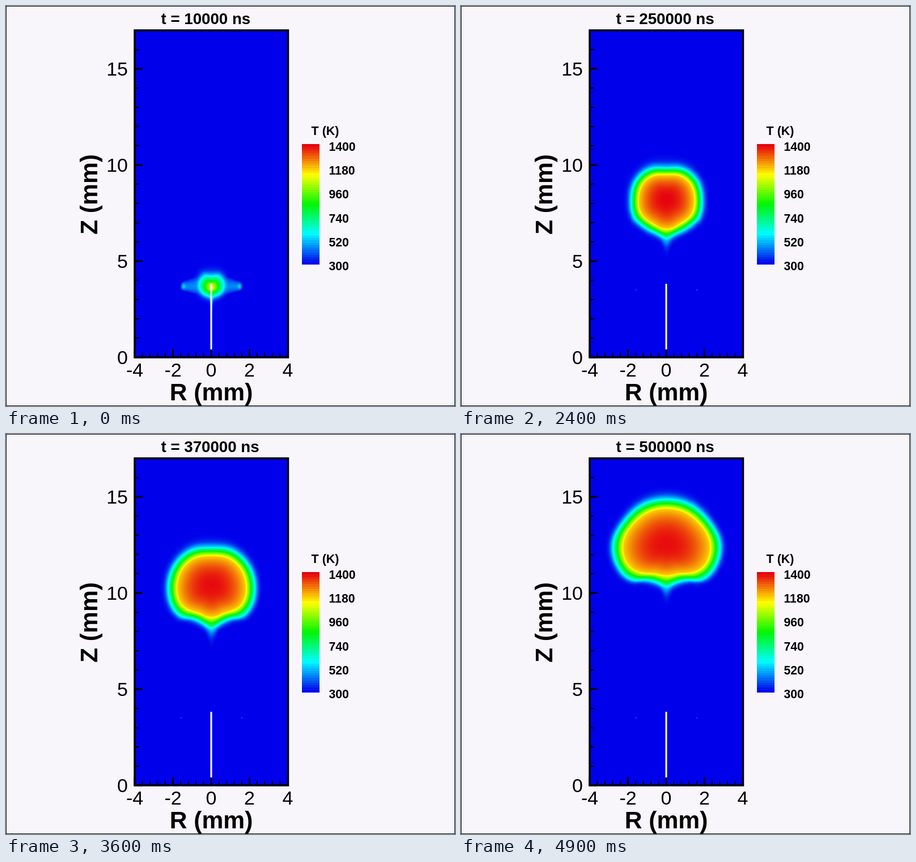
An HTML page with a canvas for the animation above (5000 ms loop, 792x707 px).

```html
<!DOCTYPE html>
<html lang="en">
<head>
<meta charset="utf-8">
<title>Temperature field</title>
<style>
html, body { margin: 0; width: 100%; height: 100%; overflow: hidden; background: #f8f6fb; }
canvas { display: block; }
</style>
</head>
<body>
<canvas id="stage" width="792" height="707"></canvas>
<script>
const ctx = document.getElementById('stage').getContext('2d');
const FONT = '"Liberation Sans", Arial, sans-serif';
const STEPS = 50, STEP_MS = 100;
const PLOT = { x: 227, y: 43, w: 270.5, h: 578 };
const CX = 362;
const STOPS = [[0, 0, 235], [0, 252, 255], [0, 246, 5], [255, 255, 0], [230, 0, 14]];

// Plume outline: radii at these angles, measured from straight up.
const ANGLES = [0, 30, 60, 90, 120, 135, 150, 165, 180];
// tail: x offset, y, vertical spread, strength
const KEYS = [
  { step: 0,  y: 497, rim: 22,   peak: 1180, tail: [50, 495, 5, 90],   r: [21, 25, 24, 22, 20, 19, 18, 18, 20] },
  { step: 8,  y: 445, rim: 13,   peak: 1560, tail: [54, 460, 14, 130], r: [37, 40, 46, 54, 44, 41, 37, 37, 44] },
  { step: 16, y: 391, rim: 13,   peak: 1420, tail: [57, 413, 17, 100], r: [45, 49, 55, 57, 58, 55, 53, 53, 62] },
  { step: 24, y: 341, rim: 16.5, peak: 1395, tail: [59, 374, 12, 70],  r: [57, 63, 65, 64, 67, 65, 64, 65, 72] },
  { step: 32, y: 291, rim: 18,   peak: 1390, tail: [59, 340, 8, 50],   r: [64, 70, 72, 73, 78, 74, 68, 69, 79] },
  { step: 40, y: 243, rim: 19.5, peak: 1385, tail: [58, 304, 8, 35],   r: [73, 77, 80, 83, 83, 83, 71, 71, 79] },
  { step: 49, y: 195, rim: 20,   peak: 1385, tail: [55, 262, 8, 30],   r: [82, 84, 87, 96, 95, 89, 74, 71, 77] }
];

const lerp = (a, b, t) => a + (b - a) * t;
const clamp = (v, lo = 0, hi = 1) => Math.min(hi, Math.max(lo, v));
const bell = v => Math.exp(-v * v);

function stateAt(step) {
  let i = 0;
  while (i < KEYS.length - 2 && step > KEYS[i + 1].step) i++;
  const a = KEYS[i], b = KEYS[i + 1];
  const t = (step - a.step) / (b.step - a.step);
  const mix = k => lerp(a[k], b[k], t);
  const mixAll = k => a[k].map((v, n) => lerp(v, b[k][n], t));
  const outer = outline(mixAll('r'));
  return {
    step, y: mix('y'), rim: mix('rim'), peak: mix('peak'), tail: mixAll('tail'),
    outer, mean: soften(outer), early: clamp(1 - step / 6)
  };
}

// Smooth outline sampled at every half degree.
function outline(r) {
  const last = r.length - 1;
  const slope = i => i === 0 ? 0
    : i === last ? (r[i] - r[i - 1]) / 15
    : (r[i + 1] - r[i - 1]) / (ANGLES[i + 1] - ANGLES[i - 1]);
  const out = [];
  for (let k = 0, i = 0; k <= 361; k++) {
    const deg = Math.min(180, k / 2);
    while (i < last - 1 && deg > ANGLES[i + 1]) i++;
    const span = ANGLES[i + 1] - ANGLES[i];
    const t = (deg - ANGLES[i]) / span, u = 1 - t;
    out.push(r[i] * (1 + 2 * t) * u * u + r[i + 1] * (1 + 2 * u) * t * t
      + span * t * u * (slope(i) * u - slope(i + 1) * t));
  }
  return out;
}

// Running mean over the neighbouring angles, mirrored at the axis.
function soften(radii) {
  const reach = 36;
  return radii.map((_, k) => {
    let sum = 0;
    for (let d = -reach; d <= reach; d++) {
      const n = Math.abs(k + d);
      sum += radii[n > 360 ? 720 - n : n];
    }
    return sum / (2 * reach + 1);
  });
}

const palette = levels => Array.from({ length: levels }, (_, n) => {
  const p = n / (levels - 1) * 4, i = Math.min(3, Math.floor(p));
  return STOPS[i].map((c, k) => Math.round(lerp(c, STOPS[i + 1][k], p - i)));
});
const pick = (colors, v) => colors[Math.floor(clamp(v, 0, 0.9999) * colors.length)];
const css = c => `rgb(${c})`;
const fieldColors = palette(256), legendColors = palette(50);

// Temperature above ambient for a horizontal distance ax and height y.
function heat(s, ax, y) {
  const dy = y - s.y;
  const r = Math.hypot(ax, dy);
  const angle = Math.atan2(ax, -dy);
  const pos = angle * 360 / Math.PI, k = Math.floor(pos);
  const R = lerp(s.outer[k], s.outer[k + 1], pos - k);
  let core;
  if (r > R) {
    const reach = 4.5 + 3 * bell(angle / 0.8) + 7 * bell((Math.PI - angle) / 0.09);
    core = 220 * Math.exp(-Math.pow((r - R) / reach, 1.3));
  } else {
    const mean = lerp(s.mean[k], s.mean[k + 1], pos - k);
    const size = lerp(R, 20, s.early);
    const width = lerp(Math.max(s.rim * 0.75, R - mean + s.rim), s.rim, s.early);
    const depth = (1 - r / R) * size;
    const x = Math.min(1, depth / width);
    core = 220 + 660 * x * (1.15 - 0.15 * x);
    const room = size - width;
    if (depth > width && room > 0) {
      const q = 1 - (depth - width) / room;
      core += (s.peak - 1180) * (1 - Math.pow(q, 2.3)) * clamp(room / 12);
    }
  }
  const [tx, ty, spread, power] = s.tail;
  const tail = power * bell((ax - tx) / 4) * bell((y - ty) / spread);
  let wing = 0;
  const fade = clamp(1 - s.step / 7);
  if (fade && ax < 55) {
    const half = 7 + (dy < -2 ? 22 : 16) * (1 - ax / 55);
    const v = (dy + 2) / half;
    wing = 150 * fade * Math.max(0, 1 - v * v) * clamp((55 - ax) / 5);
  }
  return Math.hypot(core, tail + wing);
}

function drawField(step) {
  const s = stateAt(step);
  ctx.fillStyle = css(STOPS[0]);
  ctx.fillRect(PLOT.x, PLOT.y, PLOT.w, PLOT.h);
  const top = Math.max(PLOT.y, Math.round(s.y) - 115);
  const h = 235, half = 134, w = half * 2 + 1;
  const img = ctx.createImageData(w, h);
  for (let j = 0; j < h; j++) {
    for (let i = 0; i <= half; i++) {
      const c = pick(fieldColors, heat(s, i, top + j) / 1100);
      for (const col of [half - i, half + i]) {
        const p = (j * w + col) * 4;
        img.data[p] = c[0];
        img.data[p + 1] = c[1];
        img.data[p + 2] = c[2];
        img.data[p + 3] = 255;
      }
    }
  }
  ctx.putImageData(img, CX - half, top);
  if (step > 5) {
    ctx.fillStyle = '#2f60ee';
    ctx.fillRect(308, 501, 2, 1.5);
    ctx.fillRect(415, 501, 2, 1.5);
  }
  ctx.fillStyle = '#fff';
  ctx.fillRect(360.5, 491, 3, 116);
}

function text(str, x, y, size, align = 'left', weight = 'bold') {
  ctx.font = `${weight} ${size}px ${FONT}`;
  ctx.textAlign = align;
  ctx.fillText(str, x, y);
}

function line(x1, y1, x2, y2, width) {
  ctx.lineWidth = width;
  ctx.beginPath();
  ctx.moveTo(x1, y1);
  ctx.lineTo(x2, y2);
  ctx.stroke();
}

function drawAxes() {
  const bottom = PLOT.y + PLOT.h;
  ctx.strokeStyle = ctx.fillStyle = '#000';
  for (let z = 0; z <= 17; z++) {
    const y = bottom - z * 34, major = z % 5 === 0;
    line(PLOT.x, y, PLOT.x + (major ? 14 : 8), y, major ? 3 : 2);
    if (major) text(z, 215, y + 12, 34, 'right', 'normal');
  }
  for (let n = 0; n <= 20; n++) {
    const x = PLOT.x + n * 13.5, major = n % 5 === 0;
    line(x, bottom, x, bottom - (major ? 14 : 8), major ? 3 : 2);
    if (major) text(n / 5 * 2 - 4, x, 655, 34, 'center', 'normal');
  }
  ctx.lineWidth = 3.5;
  ctx.strokeRect(PLOT.x, PLOT.y, PLOT.w, PLOT.h);
  text('R (mm)', 362, 697, 42.6, 'center');
  ctx.save();
  ctx.translate(161, 333);
  ctx.rotate(-Math.PI / 2);
  text('Z (mm)', 0, 0, 42.6, 'center');
  ctx.restore();
}

function drawLegend() {
  const y0 = 244, h = 213;
  for (let y = 0; y < h; y++) {
    ctx.fillStyle = css(pick(legendColors, 1 - (y + 0.5) / h));
    ctx.fillRect(522, y0 + y, 31, 1);
  }
  ctx.fillStyle = '#000';
  text('T (K)', 563, 228, 21.5, 'center');
  for (let n = 0; n < 6; n++) text(1400 - n * 220, 569.5, 255.5 + n * 42.35, 21.2);
}

function draw(step) {
  ctx.fillStyle = '#f8f6fb';
  ctx.fillRect(0, 0, 792, 707);
  ctx.strokeStyle = '#111';
  ctx.lineWidth = 1;
  ctx.strokeRect(0.5, 0.5, 791, 706);
  drawField(step);
  drawAxes();
  drawLegend();
  text(`t = ${(step + 1) * 10000} ns`, 273.5, 32, 27.7);
}

const start = performance.now();
let shown = -1;
function tick() {
  const step = Math.floor((performance.now() - start) / STEP_MS) % STEPS;
  if (step !== shown) draw(shown = step);
  requestAnimationFrame(tick);
}
tick();
</script>
</body>
</html>
```
